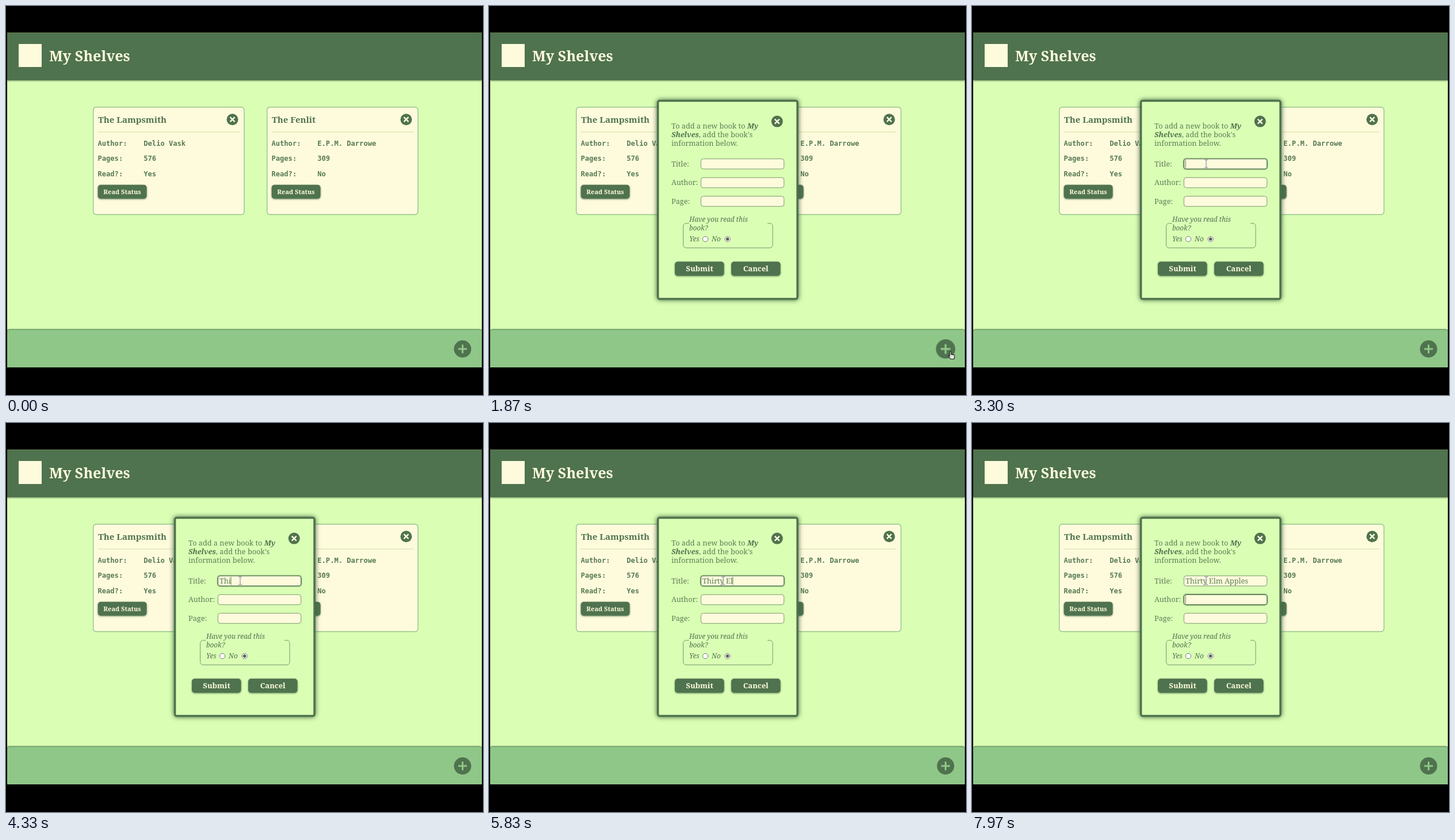
Animation of 829 by 676 pixels, one loop 8 s. Source, as an HTML page:

```html
<!DOCTYPE html>
<html lang="en">
<head>
<meta charset="utf-8">
<title>My Shelves</title>
<style>
  :root { --dark: #4f734e; --cream: #fefbdd; --loop: 8s infinite; }
  html, body { margin: 0; width: 100%; height: 100%; overflow: hidden; background: #000; }
  svg { display: block; width: 829px; height: 676px; }
  text { font-family: "Noto Serif", "Liberation Serif", serif; fill: var(--dark); white-space: pre; }
  filter { color-interpolation-filters: sRGB; }
  .dark { fill: var(--dark); }
  .cream { fill: var(--cream); }
  .heading { font-size: 25px; font-weight: 600; }
  .title { font-size: 15px; font-weight: 600; }
  .mono text { font: 700 12.1px "DejaVu Sans Mono", monospace; fill: #587a54; }
  .small { font-size: 11px; font-weight: 700; text-anchor: middle; }
  .action { font-size: 13px; font-weight: 700; text-anchor: middle; }
  .form text { font-size: 12.7px; fill: #5c7e57; }
  .form .em { font-size: 11.7px; font-style: italic; fill: var(--dark); }
  .form .cream { font-size: 13px; fill: var(--cream); }
  .strong { font-weight: 600; font-style: italic; fill: var(--dark); }
  .line { fill: none; stroke: #759767; }
  .field { fill: var(--cream); stroke: #789a68; }
  .focus { fill: var(--cream); stroke: #587a53; stroke-width: 1.4; filter: url(#halo); }
  .shade { filter: url(#drop); }

  #modal { animation: open var(--loop) step-end; }
  #focusTitle { animation: focus-title var(--loop) step-end; }
  #focusAuthor { animation: focus-author var(--loop) step-end; }
  #add { transform-origin: 793.5px 596px; animation: hover var(--loop) linear; }
  #pointer { animation: travel var(--loop) ease-in-out; }
  #arrow { animation: arrow var(--loop) step-end; }
  #hand { animation: hand var(--loop) step-end; }
  #beam { animation: beam var(--loop) step-end; }

  @keyframes open { 0% { visibility: hidden } 21.6%, 100% { visibility: visible } }
  @keyframes focus-title { 0%, 98%, 100% { visibility: hidden } 39.4% { visibility: visible } }
  @keyframes focus-author { 0% { visibility: hidden } 98%, 100% { visibility: visible } }
  @keyframes hover {
    0%, 13.5%, 33%, 100% { transform: scale(1) }
    15%, 31.5% { transform: scale(1.12) }
  }
  @keyframes travel {
    0%, 10.9% { transform: translate(829px, 636px) }
    14.4%, 30.6% { transform: translate(802px, 601px) }
    37.8%, 100% { transform: translate(407px, 274px) }
  }
  @keyframes arrow {
    0%, 13.5%, 36.9%, 100% { visibility: hidden }
    10.9%, 31.5% { visibility: visible }
  }
  @keyframes hand { 0%, 31.5%, 100% { visibility: hidden } 13.5% { visibility: visible } }
  @keyframes beam { 0% { visibility: hidden } 36.9%, 100% { visibility: visible } }
</style>
</head>
<body>
<svg viewBox="0 0 829 676">
  <defs>
    <filter id="drop" x="-20%" y="-30%" width="140%" height="180%">
      <feDropShadow dx="0" dy="1" stdDeviation="1.4" flood-color="#3f623f" flood-opacity=".75"/>
    </filter>
    <filter id="halo" x="-10%" y="-40%" width="120%" height="180%">
      <feDropShadow dx="0" dy="0" stdDeviation="1.1" flood-color="#4f734e" flood-opacity=".9"/>
    </filter>
    <filter id="glow" x="-10%" y="-10%" width="120%" height="120%">
      <feDropShadow dx="0" dy="0" stdDeviation="4" flood-color="#3c5e3b"/>
    </filter>
    <clipPath id="page"><rect x="2" y="46.5" width="825" height="581.5"/></clipPath>
    <g id="close">
      <circle r="10" class="dark"/>
      <path d="M-4-4 4 4M4-4-4 4" stroke="#fefbdd" stroke-width="2.4"/>
    </g>
    <rect id="field" x="368.3" width="144.4" height="17.6" rx="4"/>
    <rect id="button" y="444.3" width="85.5" height="24.5" rx="5" class="dark shade"/>
    <g id="card">
      <rect x="151.7" y="175.8" width="262.3" height="186.7" rx="5" fill="#fefbdd" stroke="#8fc788" stroke-width="1.4"/>
      <path d="M159.5 219H406" stroke="#d3dda2" stroke-width="1.2"/>
      <use href="#close" x="393.5" y="197.2"/>
      <g class="mono">
        <text x="159.5" y="242.8">Author:</text>
        <text x="159.5" y="269.2">Pages:</text>
        <text x="159.5" y="295.6">Read?:</text>
      </g>
      <rect x="159.7" y="310.8" width="84.8" height="24" rx="5" class="dark shade"/>
      <text x="202" y="326.6" class="small cream">Read Status</text>
    </g>
  </defs>

  <g clip-path="url(#page)">
    <rect width="829" height="676" fill="#dbfeb5"/>
    <rect x="2" y="40" width="825" height="89" class="dark shade"/>
    <rect x="22" y="66" width="40" height="40" class="cream"/>
    <text x="75" y="96" class="heading cream">My Shelves</text>

    <use href="#card"/>
    <text x="160" y="203" class="title">The Lampsmith</text>
    <g class="mono">
      <text x="239.3" y="242.8">Delio Vask</text>
      <text x="239.3" y="269.2">576</text>
      <text x="239.3" y="295.6">Yes</text>
    </g>

    <g transform="translate(302)">
      <use href="#card"/>
      <text x="160" y="203" class="title">The Fenlit</text>
      <g class="mono">
        <text x="239.3" y="242.8">E.P.M. Darrowe</text>
        <text x="239.3" y="269.2">309</text>
        <text x="239.3" y="295.6">No</text>
      </g>
    </g>

    <rect x="2" y="561.5" width="825" height="80" rx="4" fill="#6d9a68" class="shade"/>
    <rect x="2" y="563" width="825" height="80" rx="4" fill="#8fc788"/>
    <g id="add">
      <circle cx="793.5" cy="596" r="15" class="dark"/>
      <path d="M786 596h15M793.5 588.5v15" stroke="#8fc788" stroke-width="3"/>
    </g>
  </g>

  <g id="modal" class="form">
    <rect x="293.6" y="164.7" width="242.4" height="344.4" rx="3" fill="#dbfeb5" stroke="#4f734e" stroke-width="3.5" filter="url(#glow)"/>
    <use href="#close" x="500.7" y="200.6"/>
    <text x="317" y="212.7">To add a new book to <tspan class="strong">My</tspan></text>
    <text x="317" y="227.7"><tspan class="strong">Shelves</tspan>, add the book's</text>
    <text x="317" y="242.7">information below.</text>

    <text x="317" y="278.8">Title:</text>
    <text x="317" y="311.4">Author:</text>
    <text x="317" y="343.8">Page:</text>
    <use href="#field" y="265.6" class="field"/>
    <use href="#field" y="298.2" class="field"/>
    <use href="#field" y="330.6" class="field"/>
    <use id="focusTitle" href="#field" y="265.6" class="focus"/>
    <use id="focusAuthor" href="#field" y="298.2" class="focus"/>
    <text id="typed" x="371" y="278.8"></text>
    <rect id="caret" width="1" height="14" fill="#5c7e57"/>

    <path class="line" d="M347.5 377.7H342.5a5 5 0 0 0-5 5V415.3a5 5 0 0 0 5 5H488a5 5 0 0 0 5-5V382.7a5 5 0 0 0-5-5H484"/>
    <text x="348" y="374.6" class="em">Have you read this</text>
    <text x="348" y="389.6" class="em">book?</text>
    <text x="348" y="409" class="em">Yes</text>
    <text x="387" y="409" class="em">No</text>
    <g fill="#fff" stroke="#767b76">
      <circle cx="376" cy="405" r="4.6"/>
      <circle cx="414.6" cy="405" r="4.6"/>
    </g>
    <circle cx="414.6" cy="405" r="2.7" fill="#565c58"/>

    <use href="#button" x="323"/>
    <use href="#button" x="421"/>
    <text x="366" y="461" class="action cream">Submit</text>
    <text x="463.7" y="461" class="action cream">Cancel</text>
  </g>

  <g id="pointer">
    <path id="arrow" d="M0 0V12L2.8 9.4 4.6 13.4 6.6 12.5 4.8 8.7H8.6Z" fill="#111" stroke="#fff" stroke-width=".9"/>
    <path id="hand" d="M-1.2 0Q0-1.5 1.2 0V4.4L6 5.3Q7.6 5.8 7.4 7.5L6.2 12.5H.2L-3.6 7.6Q-3.5 6.2-2.2 6.6L-1.2 7.4Z" fill="#e8ebe6" stroke="#1c231c" stroke-width="1.2"/>
    <path id="beam" d="M-3-7Q0-7 0-5Q0-7 3-7M0-5V5M-3 7Q0 7 0 5Q0 7 3 7" fill="none" stroke="#9c9cb2" stroke-width="1.3"/>
  </g>
</svg>
<script>
  const LOOP = 8000, FOCUS = 3150, FIRST_KEY = 3750, KEY_GAP = 250, TAB = 7840;
  const phrase = "Thirty Elm Apples";
  const typed = document.getElementById("typed");
  const caret = document.getElementById("caret");
  const start = performance.now();

  function draw() {
    const t = (performance.now() - start) % LOOP;
    const keys = Math.floor((t - FIRST_KEY) / KEY_GAP) + 1;
    const count = Math.max(0, Math.min(phrase.length, keys));
    typed.textContent = phrase.slice(0, count);

    const onAuthor = t >= TAB;
    const blinkedOff = t >= FOCUS + 500 && t < FIRST_KEY;
    const width = count && !onAuthor ? typed.getComputedTextLength() : 0;
    caret.setAttribute("x", 370.6 + width);
    caret.setAttribute("y", onAuthor ? 300 : 267.4);
    caret.style.visibility = t >= FOCUS && !blinkedOff ? "visible" : "hidden";
    requestAnimationFrame(draw);
  }
  draw();
</script>
</body>
</html>
```
